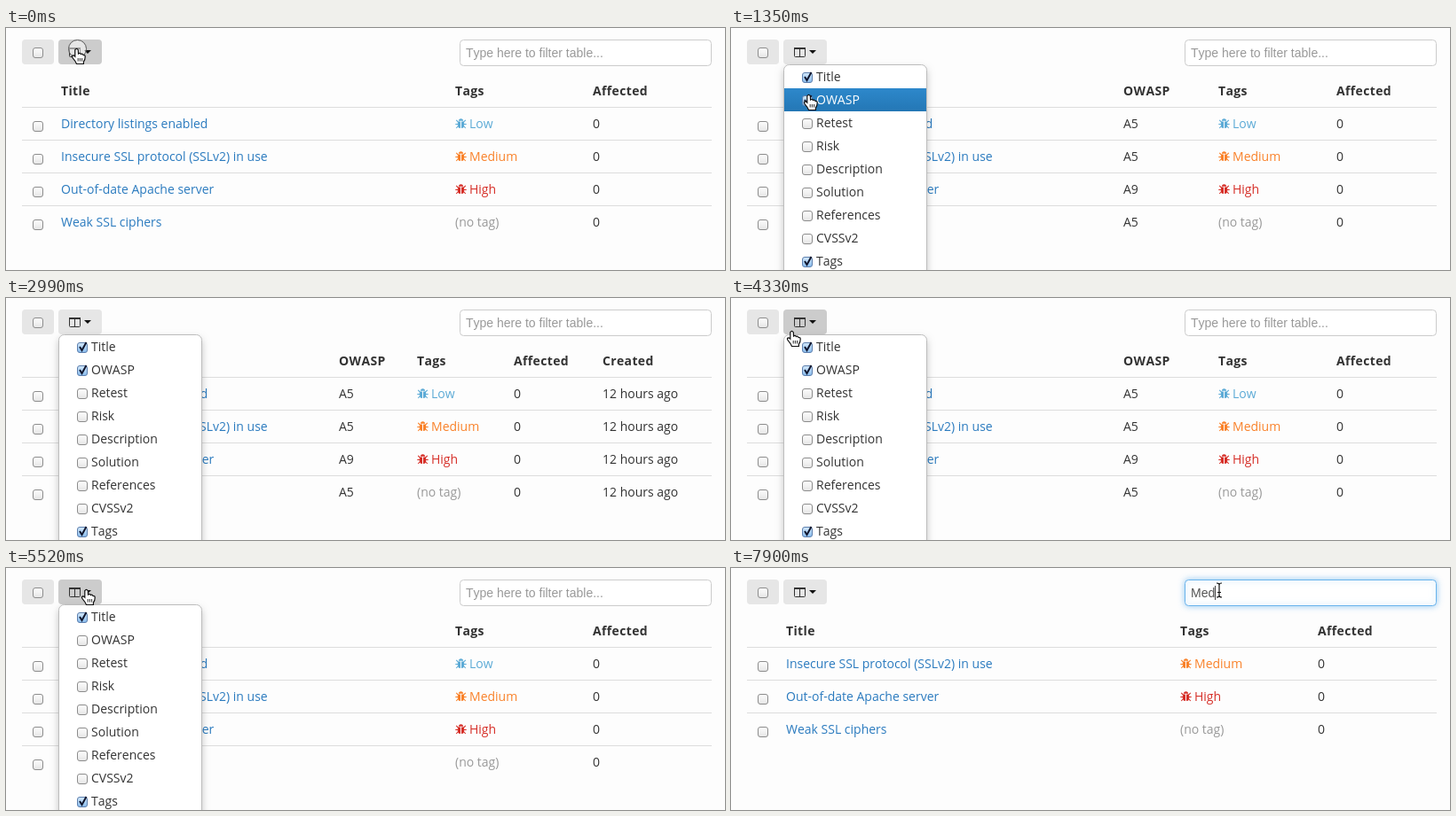
Animation of 810x273 px, one loop 8000 ms. Source, as an HTML page with a canvas:

```html
<!DOCTYPE html>
<html lang="en">
<head>
<meta charset="utf-8">
<title>Issue table columns</title>
<style>
  html, body { margin: 0; width: 100%; height: 100%; overflow: hidden; background: #fdfdfd; }
  canvas { display: block; width: 810px; height: 273px; }
</style>
</head>
<body>
<canvas id="stage"></canvas>
<script>
const W = 810, H = 273, LOOP = 8000;
const canvas = document.getElementById('stage');
const ratio = window.devicePixelRatio || 1;
canvas.width = W * ratio;
canvas.height = H * ratio;
const ctx = canvas.getContext('2d');

const SANS = '14px "Open Sans", sans-serif';
const BOLD = 'bold ' + SANS;
const FIELD = '14px "Liberation Sans", Arial, sans-serif';
const LINK = '#2b7bbf', INK = '#333';

const issues = [
  { title: 'Directory listings enabled', owasp: 'A5', tag: 'Low', color: '#5dabd6' },
  { title: 'Insecure SSL protocol (SSLv2) in use', owasp: 'A5', tag: 'Medium', color: '#f9822a' },
  { title: 'Out-of-date Apache server', owasp: 'A9', tag: 'High', color: '#d62f28' },
  { title: 'Weak SSL ciphers', owasp: 'A5' }
];
const options = ['Title', 'OWASP', 'Retest', 'Risk', 'Description',
  'Solution', 'References', 'CVSSv2', 'Tags'];
const layouts = {
  basic: { Title: 62, Tags: 506, Affected: 661 },
  owasp: { Title: 62, OWASP: 442, Tags: 549, Affected: 682 },
  dated: { Title: 62, OWASP: 375, Tags: 463, Affected: 572, Created: 672 }
};

// Each cue changes part of the state and holds until the next one.
const cues = [
  [0, { layout: 'basic', cursor: 'hand', x: 80, y: 23, press: true, typed: '' }],
  [150, { open: true, ring: true }],
  [300, { press: false }],
  [600, { x: 85, y: 51 }],
  [750, { x: 90, y: 73 }],
  [900, { x: 88, y: 75 }],
  [1200, { press: true, ring: false }],
  [1350, { press: false, layout: 'owasp' }],
  [1800, { x: 100, y: 113 }],
  [1940, { cursor: '' }],
  [2990, { layout: 'dated' }],
  [3730, { layout: 'owasp' }],
  [4030, { cursor: 'hand', x: 82, y: 77 }],
  [4180, { x: 74, y: 56 }],
  [4330, { x: 69, y: 37 }],
  [4480, { x: 80, y: 55 }],
  [4630, { x: 88, y: 75 }],
  [4930, { press: true }],
  [5080, { layout: 'basic' }],
  [5230, { press: false }],
  [5370, { x: 90, y: 52 }],
  [5520, { x: 91, y: 24 }],
  [5820, { press: true }],
  [5970, { press: false, open: false, ring: true }],
  [6120, { cursor: 'arrow', x: 190, y: 40 }],
  [6260, { x: 420, y: 27 }],
  [6410, { cursor: 'beam', x: 550, y: 25 }],
  [7010, { press: true, ring: false, focus: true }],
  [7150, { press: false }],
  [7600, { typed: 'M' }],
  [7750, { typed: 'Me' }],
  [7900, { typed: 'Med', skip: 1 }]
];

function stateAt(time) {
  const state = {};
  for (const [start, change] of cues) if (start <= time) Object.assign(state, change);
  return state;
}

function text(str, x, y, color = INK, font = SANS) {
  ctx.font = font;
  ctx.letterSpacing = font === BOLD ? '0.35px' : '0px';
  ctx.fillStyle = color;
  ctx.fillText(str, x, y);
}

function box(x, y, w, h, r, fill, stroke, line = 1) {
  ctx.beginPath();
  ctx.roundRect(x, y, w, h, r);
  if (fill) { ctx.fillStyle = fill; ctx.fill(); }
  if (stroke) { ctx.strokeStyle = stroke; ctx.lineWidth = line; ctx.stroke(); }
}

function rect(x, y, w, h, color) {
  ctx.fillStyle = color;
  ctx.fillRect(x, y, w, h);
}

function poly(points, close) {
  ctx.beginPath();
  points.forEach(([x, y]) => ctx.lineTo(x, y));
  if (close) ctx.closePath();
}

function fade(y0, y1, top, bottom) {
  const g = ctx.createLinearGradient(0, y0, 0, y1);
  g.addColorStop(0, top);
  g.addColorStop(1, bottom);
  return g;
}

function glow(color, blur, dy, draw) {
  ctx.save();
  ctx.shadowColor = color;
  ctx.shadowBlur = blur * ratio;
  ctx.shadowOffsetY = dy * ratio;
  draw();
  ctx.restore();
}

function checkbox(cx, cy, on) {
  const fill = on ? fade(cy - 6, cy + 6, '#d8ebfb', '#84b9ec')
                  : fade(cy - 6, cy + 6, '#ffffff', '#e4e4e4');
  box(cx - 5.5, cy - 5.5, 11, 11, 2.5, fill, on ? '#5d7fae' : '#8c8c8c');
  if (!on) return;
  poly([[cx - 3, cy - 1], [cx - 0.5, cy + 3], [cx + 4.5, cy - 6]]);
  ctx.strokeStyle = '#10162e';
  ctx.lineWidth = 2;
  ctx.stroke();
}

function bug(x, y, color) {
  ctx.save();
  ctx.translate(x + 6.5, y);
  ctx.fillStyle = ctx.strokeStyle = color;
  ctx.beginPath();
  ctx.arc(0, 2.8, 2.6, Math.PI, 0);
  ctx.fill();
  box(-3.6, 3.6, 3.1, 7.4, [0, 0, 0, 3], color);
  box(0.5, 3.6, 3.1, 7.4, [0, 0, 3, 0], color);
  ctx.lineWidth = 1.1;
  for (const side of [-1, 1]) {
    poly([[side * 5.3, 1.8], [side * 3, 4.2]]);
    ctx.stroke();
    poly([[side * 3, 6.5], [side * 6.2, 6.5]]);
    ctx.stroke();
    poly([[side * 3, 8.5], [side * 5.3, 11]]);
    ctx.stroke();
  }
  ctx.restore();
}

function drawToolbar(s) {
  box(18, 13, 36, 28, 4, '#e6e6e6');
  checkbox(36, 28);

  const hover = s.cursor === 'hand' && s.y < 42;
  if (s.ring) {
    glow('#4d8fdb', 3, 0, () => box(58.5, 12.5, 50, 29, 4, null, '#6ea1da', 2.5));
  }
  box(59, 13, 49, 28, s.ring ? 2 : 4, hover ? '#cccccc' : '#e6e6e6');
  if (s.ring) box(59, 13, 49, 28, 3, null, '#6ea1da', 2);

  box(71.5, 22.5, 12, 10, 1, null, INK);
  rect(71, 22, 13, 2, INK);
  rect(77, 23, 1, 10, INK);
  poly([[88, 25], [96, 25], [92, 29]], true);
  ctx.fillStyle = '#111';
  ctx.fill();
}

function drawFilter(s) {
  const field = () => box(511.5, 13.5, 283, 29, 4, '#fff', s.focus ? '#69b3ec' : '#ccc');
  if (s.focus) glow('rgba(82,168,236,.6)', 7, 0, field);
  else field();
  if (s.typed) text(s.typed, 518, 33, '#555', FIELD);
  else text('Type here to filter table...', 518, 33, '#999', FIELD);
  if (s.focus) {
    ctx.font = FIELD;
    rect(518 + Math.round(ctx.measureText(s.typed).width), 20, 1, 16, '#444');
  }
}

function drawTable(s) {
  const cols = layouts[s.layout];
  for (const name in cols) text(name, cols[name], 76, INK, BOLD);

  issues.slice(s.skip || 0).forEach((issue, i) => {
    const y = 113 + i * 37;
    rect(18, y - 24, 777, 1, '#ddd');
    checkbox(36, y - 2);
    text(issue.title, cols.Title, y, LINK);
    if (cols.OWASP) text(issue.owasp, cols.OWASP, y);
    if (issue.tag) {
      bug(cols.Tags, y - 11, issue.color);
      text(issue.tag, cols.Tags + 16, y, issue.color);
    } else {
      text('(no tag)', cols.Tags, y, '#999');
    }
    text('0', cols.Affected, y);
    if (cols.Created) text('12 hours ago', cols.Created, y);
  });
}

function drawMenu(s) {
  glow('rgba(0,0,0,.25)', 9, 4, () => box(59.5, 41.5, 161, 300, 6, '#fff'));
  box(59.5, 41.5, 161, 300, 6, '#fff', '#bdbdbd');
  const active = s.cursor === 'hand' && s.y >= 42 ? Math.floor((s.y - 42) / 26) : -1;
  options.forEach((name, i) => {
    const top = 42 + i * 26;
    const on = name in layouts[s.layout];
    if (i === active) rect(60, top, 160, 26, fade(top, top + 26, '#2d88cb', '#2477b5'));
    checkbox(86, top + 14, on);
    text(name, 96, top + 18, i === active ? '#fff' : INK);
  });
}

function drawHand() {
  ctx.beginPath();
  ctx.moveTo(-2.2, 9);
  ctx.lineTo(-2.2, 1.8);
  ctx.quadraticCurveTo(-0.5, -1, 1.3, 1.8);
  ctx.lineTo(1.5, 6);
  ctx.quadraticCurveTo(3.2, 4.4, 4.5, 6.6);
  ctx.quadraticCurveTo(6.2, 5.4, 7, 7.6);
  ctx.quadraticCurveTo(9.2, 7, 9.2, 9.4);
  ctx.quadraticCurveTo(9.2, 13, 7.4, 15);
  ctx.lineTo(7.4, 17.5);
  ctx.lineTo(-0.5, 17.5);
  ctx.quadraticCurveTo(-1.6, 14.5, -4.4, 11.4);
  ctx.quadraticCurveTo(-6.8, 8.2, -4.4, 7.8);
  ctx.quadraticCurveTo(-3.2, 7.8, -2.2, 9);
  ctx.closePath();
  ctx.fillStyle = '#fff';
  ctx.fill();
  ctx.strokeStyle = '#111';
  ctx.lineWidth = 1.2;
  ctx.stroke();
  ctx.lineWidth = 0.9;
  for (const x of [1.2, 3.4, 5.6]) {
    poly([[x, 11], [x, 14.5]]);
    ctx.stroke();
  }
}

function drawBeam() {
  ctx.lineWidth = 1.2;
  ctx.strokeStyle = '#111';
  ctx.beginPath();
  for (const end of [-1, 1]) {
    ctx.moveTo(-3, end * 8);
    ctx.quadraticCurveTo(0, end * 8, 0, end * 6);
    ctx.quadraticCurveTo(0, end * 8, 3, end * 8);
  }
  ctx.moveTo(0, -6);
  ctx.lineTo(0, 6);
  ctx.moveTo(-2, 2.5);
  ctx.lineTo(2, 2.5);
  ctx.stroke();
}

function drawArrow() {
  poly([[0, 0], [0, 14], [3.2, 11], [5.4, 16], [7.6, 15], [5.5, 10.2], [10, 10]], true);
  ctx.fillStyle = '#111';
  ctx.fill();
  ctx.strokeStyle = '#fff';
  ctx.lineWidth = 1;
  ctx.stroke();
}

const pointers = { hand: drawHand, beam: drawBeam, arrow: drawArrow };

function drawCursor(s) {
  if (!s.cursor) return;
  ctx.save();
  ctx.translate(s.x, s.y);
  if (s.press) box(-9.5, -9.5, 20, 20, 10, 'rgba(255,255,255,.5)', '#555');
  pointers[s.cursor]();
  ctx.restore();
}

function draw(time) {
  const s = stateAt(time);
  ctx.setTransform(ratio, 0, 0, ratio, 0, 0);
  ctx.fontKerning = 'none';
  rect(0, 0, W, H, '#fdfdfd');
  drawTable(s);
  drawToolbar(s);
  drawFilter(s);
  if (s.open) drawMenu(s);
  drawCursor(s);
}

const start = performance.now();
function tick() {
  draw((performance.now() - start) % LOOP);
  requestAnimationFrame(tick);
}
tick();
</script>
</body>
</html>
```
